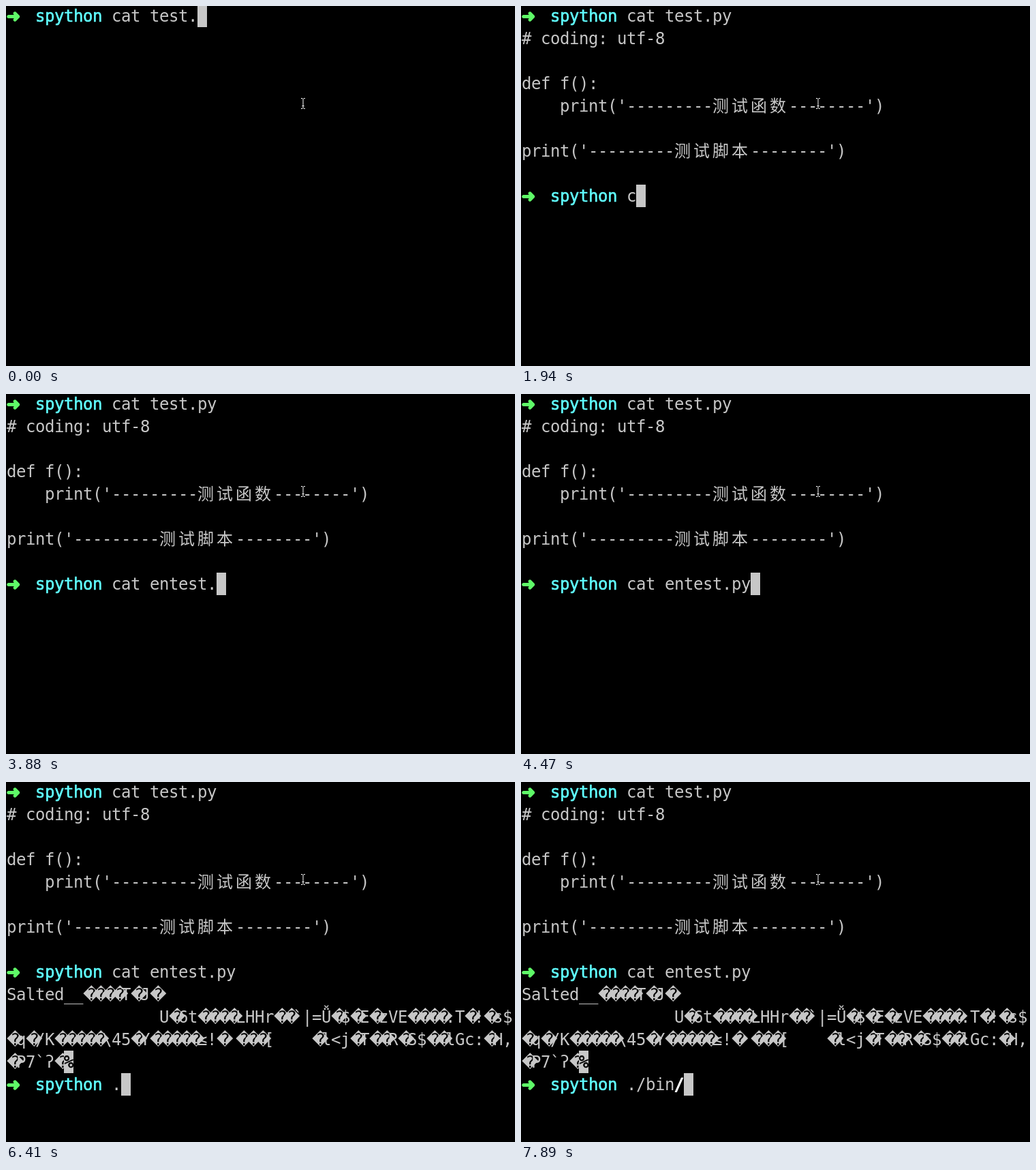
Recreate the animation shown at these times as an HTML page with a canvas. Size 747 px wide and 528 px high, loop 8 s.

```html
<!DOCTYPE html>
<html lang="en">
<head>
<meta charset="utf-8">
<title>Terminal session</title>
<style>
  html, body { margin: 0; width: 100%; height: 100%; overflow: hidden; background: #000; }
  canvas { display: block; }
</style>
</head>
<body>
<canvas id="screen" width="747" height="528"></canvas>
<script>
const ctx = document.getElementById('screen').getContext('2d');
const LOOP = 8000, CELL = 14, LINE = 33, LEFT = 1, TOP = -2, BASE = 25;
const GREY = '#c7c7c7';
const MONO = '24px "DejaVu Sans Mono", "Noto Sans CJK SC", "Noto Sans CJK", monospace';
const WIDE = '24px "DejaVu Sans", sans-serif';

// Style marks inside the text stream; weight is an extra outline in px
const pens = {
  '¹': { color: '#5ffa68', weight: 2 },
  '²': { color: '#60fdff', weight: 0.6 },
  '³': { color: GREY },
  '⁴': { color: '#000', back: GREY, weight: 0.6 },
  '⁵': { color: '#fff', weight: 1 }
};
const prompt = '¹➜  ²spython³ ';

const listing = `
# coding: utf-8

def f():
    print('---------测试函数--------')

print('---------测试脚本--------')

`;
const cipher = `
Salted__����T�J�
                U�6t����LHHr��\`|=Ǚ�$�E�zVE����.T�!�s$
�q�/K�����\\45�Y�����≤!� ���[    �l<j�T��R�S$��lGc:�H,
�P7\`ʔ�⁴%³
`;

// Time in ms and the text that appears then
const events = [
  [0, prompt + 'cat test.'], [150, 'p'], [300, 'y'],
  [890, listing], [1040, prompt],
  [1940, 'c'], [2090, 'a'], [2390, 't'], [2690, ' '], [2980, 'e'], [3130, 'n'],
  [3430, 'tes'], [3580, 't'], [3880, '.'], [4180, 'p'], [4470, 'y'],
  [4920, cipher], [5060, prompt],
  [6410, '.'], [7300, '/'], [7600, 'b'], [7750, 'in'], [7890, '⁵/']
];

function block(x, y, color) {
  ctx.fillStyle = color;
  ctx.fillRect(x, y, CELL, LINE);
}

function glyph(ch, x, y, { color, weight }) {
  ctx.font = '�➜'.includes(ch) ? WIDE : MONO;
  ctx.fillStyle = ctx.strokeStyle = color;
  ctx.fillText(ch, x, y);
  if (weight) {
    ctx.lineWidth = weight;
    ctx.strokeText(ch, x, y);
  }
}

function drawText(text) {
  let col = 0, row = 0, pen = pens['³'];
  for (const ch of text) {
    if (pens[ch]) { pen = pens[ch]; continue; }
    if (ch === '\n') { col = 0; row++; continue; }
    const x = LEFT + col * CELL, y = TOP + row * LINE;
    if (pen.back) block(x, y, pen.back);
    if (ch !== ' ') glyph(ch, x, y + BASE, pen);
    col += ch >= '一' && ch <= '鿿' ? 2 : 1;
  }
  block(LEFT + col * CELL, TOP + row * LINE, GREY);
}

const beam = new Path2D('M433 135.5h2l1 1l1-1h2M436 136.5v13M434.5 146.5h3M433 150.5h2l1-1l1 1h2');
function drawMouse() {
  for (const [width, color] of [[3, '#000'], [1, '#fff']]) {
    ctx.lineWidth = width;
    ctx.strokeStyle = color;
    ctx.stroke(beam);
  }
}

function frame() {
  const t = performance.now() % LOOP;
  ctx.lineJoin = 'round';
  ctx.fillStyle = '#000';
  ctx.fillRect(0, 0, 747, 528);
  drawText(events.filter(e => e[0] <= t).map(e => e[1]).join(''));
  drawMouse();
  requestAnimationFrame(frame);
}
frame();
</script>
</body>
</html>
```
